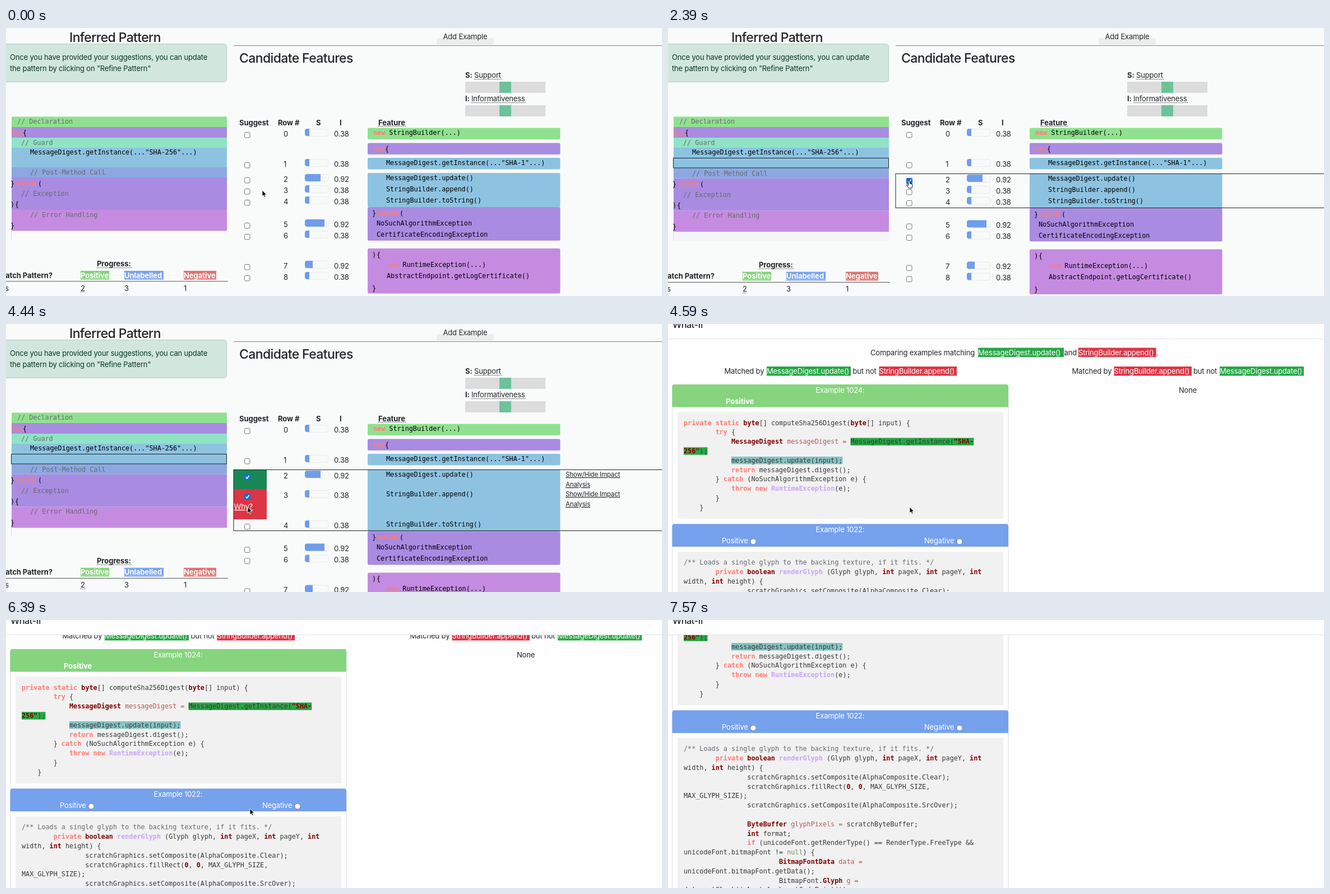
An HTML page for the animation above (8170 ms loop, 1170 px wide and 479 px high).

```html
<!DOCTYPE html>
<html lang="en">
<head>
<meta charset="utf-8">
<title>Pattern refinement</title>
<style>
  html, body { margin: 0; width: 100%; height: 100%; overflow: hidden; background: #f9fbfa; }
  svg { display: block; }
  text { font: 13px Inter, "Open Sans", sans-serif; letter-spacing: -.17px; fill: #212529; white-space: pre; }
  .b { font-weight: 700; letter-spacing: -.05px; }
  .h { font-size: 23px; font-weight: 500; letter-spacing: -.62px; }
  .title { font-size: 16.3px; font-weight: 500; letter-spacing: -.5px; }
  .small { font-size: 11.5px; text-decoration: underline; }
  .link { text-decoration: underline; }
  .w { fill: #fff; }
  .note { fill: #0a3622; }
  .mid { text-anchor: middle; }
  .end { text-anchor: end; }
  .m { font: 11.77px "DejaVu Sans Mono", "Liberation Mono", monospace; letter-spacing: 0; fill: #000; }
  .code { fill: #383838; }
  .c { fill: #666b70; }
  .k { fill: #ff7b72; font-weight: 700; }
  .d { fill: #800000; font-weight: 700; }
  .v { fill: #b95858; }
  .f { fill: #cba3fb; font-weight: 700; }
  .n { fill: #5f9a4c; }
</style>
</head>
<body>
<svg width="1170" height="479" viewBox="0 0 1170 479">
  <clipPath id="body"><rect y="27" width="1170" height="452"/></clipPath>
  <g id="main"></g>
  <g id="what">
    <rect width="1170" height="479" fill="#fefefe"/>
    <g clip-path="url(#body)"><g id="scroll"></g></g>
    <path d="M0 26.5H1170" stroke="#dee2e6"/>
    <text class="title" x="8" y="6.5">What-If</text>
  </g>
  <path id="cursor" stroke-width=".9" stroke-linejoin="round"/>
</svg>
<script>
const $ = id => document.getElementById(id);
const GREEN = '#90e18f', TEAL = '#90e3c4', BLUE = '#8dc3e1', INDIGO = '#8da7e1',
      PURPLE = '#a98be1', PINK = '#c58be1', YES = '#28a745', NO = '#dc3545';

const rect = (x, y, w, h, fill, rx = 0, extra = '') =>
  `<rect x="${x}" y="${y}" width="${w}" height="${h}" fill="${fill}" rx="${rx}" ${extra}/>`;
const text = (x, y, s, cls = '') =>
  `<text x="${x}" y="${y}" class="${cls}">${s.replace(/‹(.)(.*?)›/g, '<tspan class="$1">$2</tspan>')}</text>`;
const mono = (x, y, s, cls = '') => text(x, y, s, 'm ' + cls);
const path = (d, stroke, extra = '') => `<path d="${d}" fill="none" stroke="${stroke}" ${extra}/>`;
const solid = (d, fill) => `<path d="${d}" fill="${fill}"/>`;
const dots = (x, y, w, color = '#222') => path(`M${x} ${y}h${w}`, color, 'stroke-dasharray="1.2 1.2"');

// The fixed try / catch skeleton around the features
const tryLine = (x, y) => mono(x, y, '‹ktry›') + mono(x + 21, y, '{');
const catchLine = (x, y) => mono(x, y, '}') + mono(x + 10, y, '‹kcatch›') + mono(x + 49, y, '(');
const closeLine = (x, y) => mono(x, y, ')') + mono(x + 8, y, '{');

// baseline, support bar width, text x, feature
const rows = [
  [191, 8, 655, '‹knew› StringBuilder(...)'],
  [245, 8, 678, 'MessageDigest.getInstance(..."SHA-1"...)'],
  [272, 28, 678, 'MessageDigest.update()'],
  [292, 8, 678, 'StringBuilder.append()'],
  [312, 8, 678, 'StringBuilder.toString()'],
  [353, 35, 661, 'NoSuchAlgorithmException'],
  [373, 8, 661, 'CertificateEncodingException'],
  [427, 14, 679, '‹knew› RuntimeException(...)'],
  [447, 8, 679, 'AbstractEndpoint.getLogCertificate()']
];

function pattern(state) {
  const d = state ? 1.7 : 0;
  const band = (y, h, fill) => rect(10, y, 384, h, fill);
  return (state == 1 ? rect(10, 364, 384, 17, '#f4f5f5') : '') +
    path('M9.5 362V380', '#ddd') +
    band(158.5, 19, GREEN) + band(177, 19, PURPLE) + band(196, 18, TEAL) + band(214, 36 + d, BLUE) +
    band(249 + d, 18, INDIGO) + band(267 + d, 58, PURPLE) + band(325 + d, 37.5, PINK) +
    (state ? rect(9.5, 232.5, 384, 17.5, 'none', 0, 'stroke="#222"') : '') +
    mono(20, 171, '// Declaration', 'c') + tryLine(9, 191) +
    mono(27, 209, '// Guard', 'c') + mono(43, 226, 'MessageDigest.getInstance(..."SHA-256"...)') +
    mono(43, 262 + d, '// Post-Method Call', 'c') + catchLine(8, 281.5 + d) +
    mono(27, 300 + d, '// Exception', 'c') + closeLine(8, 319 + d) +
    mono(43, 337.5 + d, '// Error Handling', 'c') + mono(8, 357 + d, '}') +
    text(162, 426 + d, 'Progress:', 'b') + dots(162, 428.5 + d, 63) +
    text(83, 446.5 + d, 'Match Pattern?', 'b end') + text(5, 469.5 + d, 's', 'end') +
    [[133, 51, 'Positive', '#85d37d', 2], [211, 70, 'Unlabelled', '#7aa3ee', 3], [317, 58, 'Negative', '#dc7472', 1]]
      .map(([x, w, s, fill, n]) => rect(x, 434 + d, w, 16, fill) + text(x, 446.5 + d, s, 'b w') +
        dots(x, 448.5 + d, w, '#fff') + text(x, 469.5 + d, '' + n)).join('') +
    dots(133, 471.5 + d, 8) + path(`M0 ${452.8 + d}H396`, '#555');
}

function checkbox(y, on) {
  return on
    ? rect(425, y, 11, 11, '#0b6fdb', 2) + path(`M427.6 ${y + 5.8}l2.2 2.4 3.8-5.4`, '#fff', 'stroke-width="1.6"')
    : rect(425.5, y + .5, 9.5, 9.5, '#fff', 2, 'stroke="#767676"');
}

function table(state) {
  const shift = i => i < 2 ? 0 : (i == 2 ? [0, 1, 1, 1] : i == 3 ? [0, 1, 16, 16] :
    i == 4 ? [0, 1, 16, 50] : [0, 1.6, 16.6, 50.4])[state];
  const d = shift(5), top = state ? 260 : 259;
  const block = (y, h, fill) => rect(645, y, 343.5, h, fill, 2.5);
  let s = block(178.5, 20.5, GREEN) + block(205.5, 20.5, PURPLE) + block(232, 20.5, BLUE) +
    block(top, 320.5 + d - top, BLUE) + block(320 + d, 60, PURPLE) + block(394 + d, 80.5, PINK) +
    tryLine(655, 220) + catchLine(653, 335 + d) + closeLine(653, 409 + d) + mono(653, 469 + d, '}');
  if (state > 1) s += rect(406, 260, 59, 35.5, '#198754');
  if (state > 2) s += rect(406, 295, 59, 54, NO) + text(406.5, 331, 'Why?', 'w link');
  if (state) s += rect(406, 260.5, 800, Math.round(59 + d), 'none', 0, 'stroke="#222"');
  rows.forEach(([y0, w, x, feature], i) => {
    const y = y0 + shift(i);
    s += checkbox(y - 5, i == 2 && state > 0 || i == 3 && state > 2) +
      text(495, y + 2.5, '' + i) + text(585, y + 2.5, w > 8 ? '0.92' : '0.38') +
      rect(533.5, y - 10.5, 41.5, 13, '#f8f9f9', 4, 'stroke="#e7e9ea"') +
      solid(`M${533 + w} ${y - 11}h${4 - w}q-4 0-4 4v5q0 4 4 4h${w - 4}z`, '#6f9dea') +
      mono(x, y, feature);
    if (i == 2 && state > 1 || i == 3 && state > 2)
      s += text(998, y, 'Show/Hide Impact', 'small') + text(998, y + 18, 'Analysis', 'small');
  });
  return s;
}

function slider(y, letter, x, label, w) {
  return text(819, y, letter + ':', 'b') + text(x, y, label) + dots(x, y + 2.5, w) +
    rect(819, y + 7, 143, 20, '#dcdcdc') + rect(880, y + 7, 21, 20, '#6dc299');
}

function mainView(state) {
  return rect(0, 0, 1170, 479, '#f9fbfa') +
    text(113, 25, 'Inferred Pattern', 'h') +
    rect(-20, 28.5, 413.5, 68, '#d1e7dd', 5, 'stroke="#a8d0bd"') +
    text(7, 57, 'Once you have provided your suggestions, you can update', 'note') +
    text(7, 77, 'the pattern by clicking on "Refine Pattern"', 'note') +
    rect(768, 18, 102, 12, '#ebecec', 3) + text(819, 20.3, 'Add Example', 'mid') +
    path('M406 31.5H1170', '#808080') + text(416, 62, 'Candidate Features', 'h') +
    slider(89, 'S', 835, 'Support', 49) + slider(131, 'I', 830, 'Informativeness', 97) +
    [[416, 'Suggest'], [485, 'Row #'], [553, 'S'], [595, 'I'], [664, 'Feature']]
      .map(([x, s]) => text(x, 173.5, s, 'b')).join('') + dots(664, 175.5, 50) +
    pattern(state) + table(state);
}

const digest = `‹kprivate› ‹kstatic› ‹dbyte›[] computeSha256Digest(‹dbyte›[] input) {
        ‹ktry› {
            ‹dMessageDigest› ‹vmessageDigest =› MessageDigest.getInstance(‹d"SHA-›
‹d256"›);
            messageDigest.update(input);
            ‹kreturn› messageDigest.digest();
        } ‹kcatch› (NoSuchAlgorithmException e) {
            ‹kthrow› ‹knew› ‹fRuntimeException›(e);
        }
    }`;
const glyph = `‹c/** Loads a single glyph to the backing texture, if it fits. */›
        ‹kprivate› ‹dboolean› ‹frenderGlyph› (Glyph glyph, ‹dint› pageX, ‹dint› pageY, ‹dint›
width, ‹dint› height) {
                scratchGraphics.setComposite(AlphaComposite.Clear);
                scratchGraphics.fillRect(‹d0›, ‹d0›, MAX_GLYPH_SIZE,
MAX_GLYPH_SIZE);
                scratchGraphics.setComposite(AlphaComposite.SrcOver);

                ‹dByteBuffer› ‹vglyphPixels =› scratchByteBuffer;
                ‹dint› format;
                ‹kif› (unicodeFont.getRenderType() == RenderType.FreeType &amp;&amp;
unicodeFont.bitmapFont != ‹nnull›) {
                        ‹dBitmapFontData› ‹vdata =›
unicodeFont.bitmapFont.getData();
                        BitmapFont.‹dGlyph› ‹vg =›
data.getGlyph((‹dchar›)glyph.getCodePoint())`;

const lines = (y, src) => src.split('\n').map((s, i) => mono(28, y + 16.8 * i, s, 'code')).join('');
const update = (x, y, w = 150) => rect(x, y - 13, w, 16.5, YES) + text(x, y, 'MessageDigest.update()', 'w');
const append = (x, y) => rect(x, y - 13, 138.5, 16.5, NO) + text(x, y, 'StringBuilder.append()', 'w');
const radio = (x, y, s, cx) => text(x, y, s, 'w') +
  `<circle cx="${cx}" cy="${y - 3}" r="5" fill="#fff" stroke="#777" stroke-width=".8"/>`;

function card(y, h, fill, title) {
  return rect(7.5, y + .5, 599.5, h, '#fefefe', 4, 'stroke="#dcdee0"') +
    solid(`M7.5 ${y + 40.5}v-37q0-3.5 3.5-3.5h592.5q3.5 0 3.5 3.5v37z`, fill) +
    text(307, y + 14.5, title, 'w mid') + rect(17, y + 49.5, 581, h - 58.5, '#f1f1f1');
}

function whatView() {
  return text(361, 55.5, 'Comparing examples matching') + update(553, 55.5, 153) + text(706.5, 55.5, 'and') +
    append(732, 55.5) + text(870.5, 55.5, '.') +
    text(100.5, 89, 'Matched by') + update(176, 89) + text(329.5, 89, 'but not') + append(376.5, 89) +
    text(720.5, 89, 'Matched by') + append(795.5, 89) + text(937, 89, 'but not') + update(984, 89) +
    text(911, 122.5, 'None') +
    card(108, 249, '#86d47e', 'Example 1024:') + text(103, 142.8, 'Positive', 'b w') +
    rect(325.6, 203.5, 219.7, 13.5, YES) + rect(28, 220.3, 42.5, 13.5, YES) + rect(113, 237, 198.4, 13.5, '#85c4c5') +
    lines(180.5, digest) +
    card(357.5, 400, '#76a1ed', 'Example 1022:') + radio(96, 392, 'Positive', 152) + radio(457, 392, 'Negative', 520) +
    lines(430.3, glyph);
}

// path, fill, stroke; the hot spot is at 0,0
const shapes = {
  arrow: ['M0 0V11L2.5 8.7 4.2 12.5 6 11.7 4.4 8H7.7Z', '#000', '#fff'],
  hand: ['M-1.3 1a1.3 1.3 0 0 1 2.6 0V5l3.7 1q1.2 .5 1 2.2l-1 5h-5.5l-3.7-4.7q-.6-1.7 1-1.3l1.9 1.3Z', '#fff', '#000'],
  beam: ['M-2.5-8.5Q0-8.5 0-6.5Q0-8.5 2.5-8.5M0-7V7M-2.5 8.5Q0 8.5 0 6.5Q0 8.5 2.5 8.5', 'none', '#222']
};

// How many of n evenly spaced steps from a to b have happened
const stepsDone = (t, a, b, n) =>
  Math.max(0, Math.min(n, Math.floor((t - a) / (b - a) * (n - 1) + 1.05)));

// start, end, steps, target
const moves = [
  [900, 1500, 5, 430, 273],
  [2540, 2980, 4, 431, 304],
  [3710, 4150, 4, 431, 327],
  [5940, 5940, 1, 435, 337]
];

function pointer(t) {
  if (t >= 7270) return ['beam', t < 7420 ? 435 : 510, 338];
  let x = 457, y = 290;
  for (const [a, b, n, tx, ty] of moves) {
    const p = n > 1 ? stepsDone(t, a, b, n) / n : +(t >= b);
    x += (tx - x) * p;
    y += (ty - y) * p;
  }
  return [t >= 1500 && t < 4440 ? 'hand' : 'arrow', x, y];
}

// Page offset after each wheel step of two swipes
const offsets = [0, 20, 56, 80, 98, 116, 145, 180, 196];
const start = performance.now();
let shown = -1;

function draw() {
  const t = (performance.now() - start) % 8170;
  const state = t < 1950 ? 0 : t < 2540 ? 1 : t < 3130 ? 2 : 3;
  if (state != shown) $('main').innerHTML = mainView(shown = state);
  $('what').style.display = t < 4590 ? 'none' : '';
  $('scroll').setAttribute('transform', `translate(0 ${-offsets[stepsDone(t, 6240, 7270, 8)]})`);

  const [kind, x, y] = pointer(t), [d, fill, stroke] = shapes[kind], cursor = $('cursor');
  cursor.style.display = t < 7570 ? '' : 'none';
  const look = { d, fill, stroke, transform: `translate(${x} ${y})` };
  for (const key in look) cursor.setAttribute(key, look[key]);
  requestAnimationFrame(draw);
}

$('scroll').innerHTML = whatView();
draw();
</script>
</body>
</html>
```
